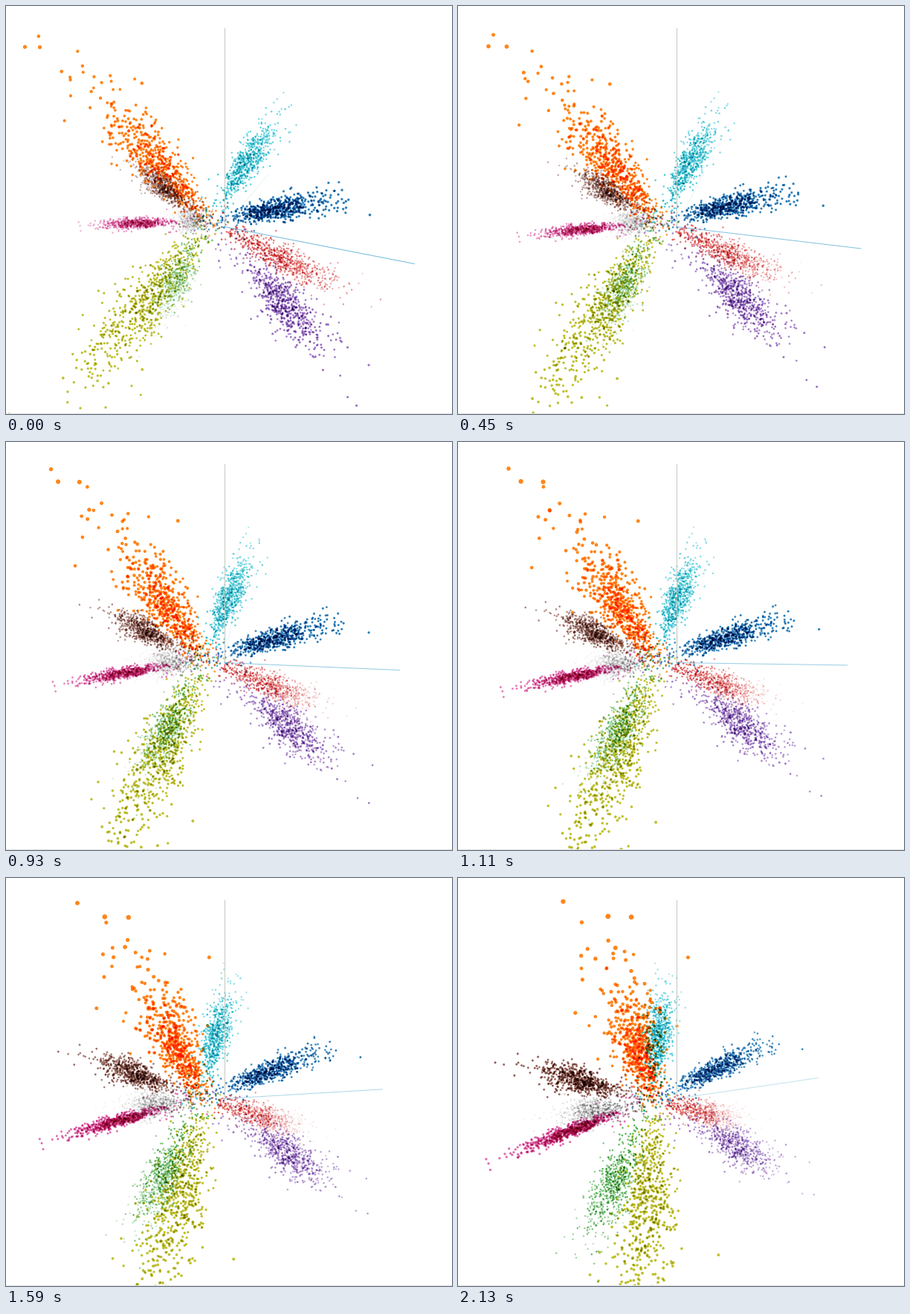
Write a matplotlib script that moves like this. It is 600 px wide and 550 px high and loops after 2.16 s.

```python
import numpy as np
import matplotlib.pyplot as plt
from matplotlib.animation import FuncAnimation

W, H = 600, 550
FRAMES, STEP_MS = 72, 30
SWEEP = np.radians(39)            # turn over the whole loop
TILT = np.arcsin(0.482)           # camera height above the ground plane
DIST = 421                        # camera distance, also the focal length
CX, CY = 293.5, 297.5
AXIS_LEN, AXIS_ANGLE = 227, np.radians(22.07)
DOT = 2.7
COUNT, INNER, TAIL = 650, 26, 24  # points per cluster, near the hub, far out

rng = np.random.default_rng(7)
HUB = np.array([-22, -4, -24])

# Each cluster is a spoke out of the hub: colour, centre, stretch, spread
SPOKES = [
    ("#17becf", (36, 66, -84), .31, 9.5),
    ("#1f77b4", (64, 31, 12), .29, 7),
    ("#d62728", (92, -72, -26), .33, 10.5),
    ("#9467bd", (77, -88, 49), .22, 12),
    ("#bcbd22", (-96, -68, 68), .34, 15),
    ("#2ca02c", (-86, -140, -46), .26, 14),
    ("#de64aa", (-132, -19, -44), .23, 4),
    ("#8c564b", (-95, 24, -84), .24, 8.5),
    ("#7f7f7f", (-66, -64, -142), .29, 12),
    ("#ff7f0e", (-69, 89, 26), .37, 11),
]


def rgb(code):
    return np.array([int(code[i:i + 2], 16) for i in (1, 3, 5)]) / 255


def make_spoke(centre, stretch, spread):
    """Normal spread along the spoke, plus points by the hub and a long tail."""
    t = 1 + stretch * rng.normal(size=COUNT)
    t[:INNER] = rng.uniform(0, 0.6, INNER)
    t[-TAIL:] = 1 + stretch * (1.5 + 2.1 * np.linspace(0, 1, TAIL) ** 2)
    width = spread * (0.5 + 0.5 * np.abs(t))
    width[:INNER] = 13
    along = HUB + t[:, None] * (np.array(centre) - HUB)
    return along + width[:, None] * rng.normal(size=(COUNT, 3))


def project(p, angle):
    """Turn about the vertical axis; return screen x, y and relative depth."""
    c, s = np.cos(angle), np.sin(angle)
    x = p[:, 0] * c + p[:, 2] * s
    z = p[:, 2] * c - p[:, 0] * s
    up = p[:, 1] * np.cos(TILT) - z * np.sin(TILT)
    q = 1 - (p[:, 1] * np.sin(TILT) + z * np.cos(TILT)) / DIST
    return CX + x / q, CY - up / q, q


POINTS = np.vstack([make_spoke(*shape) for _, *shape in SPOKES])
COLORS = np.repeat([rgb(code) for code, *_ in SPOKES], COUNT, axis=0)
GX, GY = (g.ravel() for g in np.meshgrid(np.arange(-4, 5), np.arange(-4, 5)))


def render(angle):
    """Splat soft-edged discs with multiply blending and depth fog."""
    sx, sy, q = project(POINTS, angle)
    radius = DOT / q / 2
    fog = np.clip((1.38 - q) / 0.45, 0.1, 0.95)
    px = np.floor(sx).astype(int)[:, None] + GX
    py = np.floor(sy).astype(int)[:, None] + GY
    gap = np.hypot(px + 0.5 - sx[:, None], py + 0.5 - sy[:, None])
    cover = np.clip(radius[:, None] + 0.5 - gap, 0, 1)
    hit = (cover > 0) & (px >= 0) & (px < W) & (py >= 0) & (py < H)
    who = np.nonzero(hit)[0]
    cell = py[hit] * W + px[hit]
    ink = cover[hit] * fog[who]
    img = np.empty((H * W, 3))
    for ch in range(3):
        light = np.log(1 - ink * (1 - COLORS[who, ch]))
        img[:, ch] = np.exp(np.bincount(cell, light, H * W))
    return img.reshape(H, W, 3)


fig = plt.figure(figsize=(W / 100, H / 100), dpi=100, facecolor="white")
ax = fig.add_axes([0, 0, 1, 1])
ax.axis("off")
picture = ax.imshow(np.ones((H, W, 3)), extent=(0, W, H, 0),
                    interpolation="nearest", aspect="auto")
ax.set_xlim(0, W)
ax.set_ylim(H, 0)

ax.plot([0, W], [548.9, 548.9], color="#e2e2e2", lw=0.8)
ax.plot([CX, CX], [30, CY], color="#c4c7bf", lw=0.72)
ca, sa = np.cos(AXIS_ANGLE), np.sin(AXIS_ANGLE)
TIPS = AXIS_LEN * np.array([[ca, 0, sa], [sa, 0, -ca]])
spokes = [ax.plot([], [], color="#4fa9d0", lw=0.72)[0] for _ in TIPS]


def update(i):
    angle = SWEEP * i / (FRAMES - 1)
    picture.set_data(render(angle))
    for line, x, y, q in zip(spokes, *project(TIPS, angle)):
        line.set_data([CX, x], [CY, y])
        line.set_alpha(float(np.clip(2 - 1.45 * q, 0.12, 0.85)))
    return [picture, *spokes]


anim = FuncAnimation(fig, update, frames=FRAMES, interval=STEP_MS, repeat=True)
plt.show()
```
